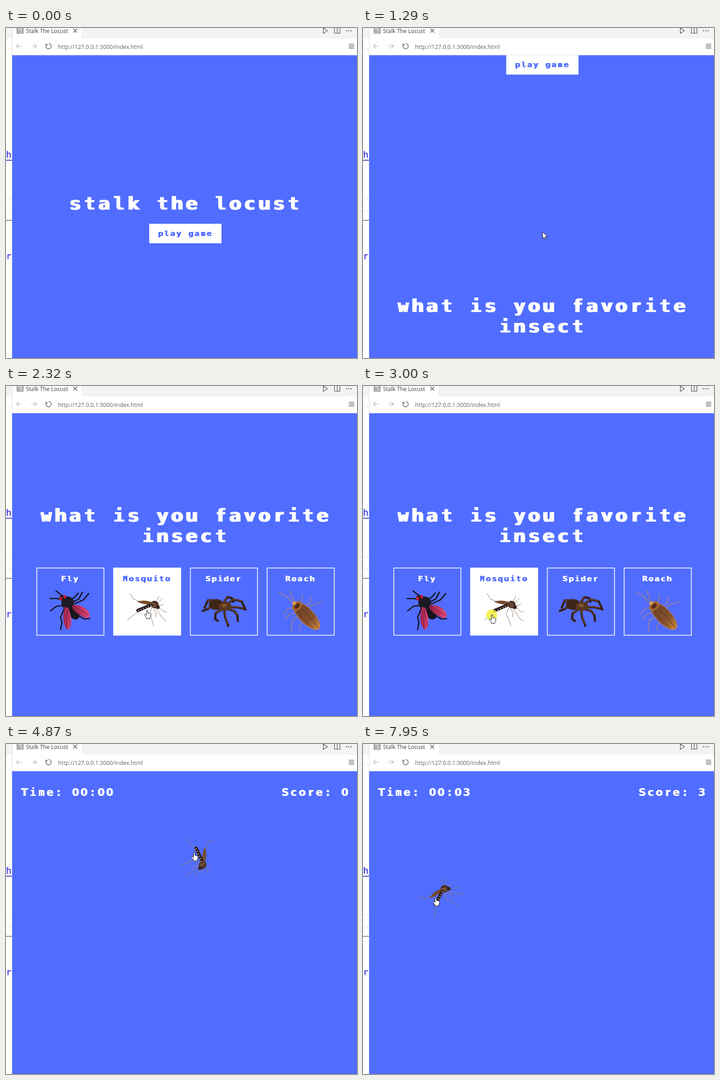
Write an HTML page that moves like this. It is 772 by 725 pixels and loops after 8 s.

```html
<!DOCTYPE html>
<html lang="en">
<head>
<meta charset="utf-8">
<title>Stalk The Locust</title>
<style>
  html, body { margin: 0; width: 100%; height: 100%; overflow: hidden; background: #fff; }
  svg { display: block; width: 772px; height: 725px; }
  .ui { font-family: "Open Sans", "Noto Sans", sans-serif; font-size: 12.3px; fill: #3b3b3b; }
  .code { font: 20px "DejaVu Sans Mono", monospace; fill: #1616e0; }
  .game {
    font-family: "DejaVu Sans", sans-serif; font-weight: 700; text-anchor: middle;
    color: #fff; fill: currentColor; filter: drop-shadow(.08em 0 0 currentColor);
  }
  .slab { font-family: "DejaVu Sans Mono", monospace; }
  .line { fill: none; stroke: #4a4a4a; stroke-width: 1.2; }
  .legs { fill: none; stroke-linecap: round; stroke-linejoin: round; }
</style>
</head>
<body>
<svg id="stage" viewBox="0 0 772 725" xmlns="http://www.w3.org/2000/svg">
  <defs>
    <clipPath id="view"><rect x="13" y="59.500" width="759" height="665.500"/></clipPath>
    <linearGradient id="shell" x1="0" x2="1">
      <stop offset="0" stop-color="#d89a50"/><stop offset=".25" stop-color="#74452a"/>
      <stop offset=".65" stop-color="#85502c"/><stop offset="1" stop-color="#d08a44"/>
    </linearGradient>
    <linearGradient id="wing" x1="0" x2="1">
      <stop offset="0" stop-color="#9c2045"/><stop offset="1" stop-color="#e8487a"/>
    </linearGradient>
    <g id="mosquito">
      <g class="legs" stroke="#927a6c" stroke-width="1">
        <path d="M4-13L-14-19-30-25-37-37M8-10L-22 5-43 21M12-9L5 8 11 21 15 34M18-10L29-4 36 2 43 4M17-8L27 6 34 17 42 23M16-16L22-22 26-31M20-14L29-21 34-27M23-9L37-13"/>
        <path d="M12-9L20 6 19 15"/>
      </g>
      <path d="M14-17Q-6-25-22-19Q-4-11 14-13z" fill="#6e4426"/>
      <path d="M-20-18.500L12-15.500" class="legs" stroke="#a4764a" stroke-width=".8"/>
      <path d="M-20 0L9-12" class="legs" stroke="#2a1a1c" stroke-width="7"/>
      <path d="M-19 .500L10-11" class="legs" stroke="#e8dcd4" stroke-width="3.500" stroke-dasharray="1.300 4.500" style="stroke-linecap:butt"/>
      <ellipse cx="17" cy="-13" rx="9" ry="8" transform="rotate(25 17 -13)" fill="#4c3224"/>
      <path d="M11-17L20-12M14-10L21-8" class="legs" stroke="#b58c62" stroke-width="1.300"/>
      <circle cx="24" cy="-7" r="4" fill="#33211c"/>
    </g>
    <g id="fly">
      <path class="legs" stroke="#14131b" stroke-width="2.700" d="M125 471L113 467 97 467M127 463L116 455 110 450M139 468L149 466 159 455M148 474L160 468 168 453M152 478L170 470 182 456M127 482L111 484 98 494M129 487L120 508 123 520 120 535M160 505L173 512 184 511"/>
      <ellipse cx="149" cy="496" rx="12" ry="18" transform="rotate(-25 149 496)" fill="#17151d"/>
      <ellipse cx="136" cy="477" rx="14" ry="15" transform="rotate(-25 136 477)" fill="#1c1a24"/>
      <path d="M130 485Q122 508 130 529Q137 540 142 529Q147 512 137 488z" fill="url(#wing)"/>
      <path d="M146 481Q170 480 182 497Q188 508 177 510Q157 503 146 489z" fill="url(#wing)"/>
      <path class="legs" stroke="#5e1631" d="M134 490L134 534M135 492L142 527M148 484L182 504M147 487L172 508"/>
      <ellipse cx="124" cy="465" rx="7" ry="6" fill="#22161c"/>
      <ellipse cx="120" cy="467" rx="3" ry="4" fill="#c81c34"/>
      <ellipse cx="129" cy="463" rx="3" ry="4" fill="#c81c34"/>
    </g>
    <g id="spider">
      <path class="legs" stroke="#33201b" stroke-width="5" d="M470 486L455 481 444 490 433 494M472 480L455 471 444 471 437 487M474 491L461 499 460 512 466 516M480 492L482 508 489 527M488 490L502 494 509 504 510 516M489 486L508 486 522 489 527 491M486 479L501 469 518 473 525 487M478 477L487 464 497 466 500 474"/>
      <path class="legs" stroke="#6e462c" stroke-width="2" d="M470 485L455 480 444 489M472 479L455 470 444 471M474 491L461 498M481 492L483 508 487 522M488 489L502 493 508 502M489 485L508 485 521 488M486 478L501 468 518 472M478 476L487 464"/>
      <ellipse cx="462" cy="480" rx="16" ry="12" fill="#402619"/>
      <ellipse cx="482" cy="484" rx="14" ry="10" fill="#58361f"/>
      <ellipse cx="480" cy="482" rx="6" ry="4" fill="#80532f"/>
    </g>
    <g id="roach">
      <path class="legs" stroke="#c58a58" stroke-width="1.200" d="M628 474L617 462 599 453M632 471L628 460 625 449M644 480L651 471 652 458M654 485L669 477 670 462M661 492L675 480 697 474M631 488L620 489 611 501M636 498L622 503 614 512M643 507L630 514 627 541M652 518L645 529 649 537"/>
      <g transform="translate(661 505) rotate(46)">
        <ellipse rx="39" ry="16" fill="url(#shell)" stroke="#bd814a"/>
        <path class="legs" stroke="#5c3520" d="M-28 0Q0-6 36 0M-24 6Q0 11 30 8"/>
        <ellipse cx="-30" rx="9" ry="12" fill="#a5692f"/>
        <ellipse cx="-30" rx="5" ry="7" fill="#553019"/>
        <circle cx="-39" r="4.500" fill="#d19a5a"/>
      </g>
    </g>
  </defs>

  <rect width="772" height="725" fill="#fff"/>
  <path d="M0 0H772V23H0z" fill="#f3f3f3"/>
  <path d="M13 0H166V24H13z" fill="#fff"/>
  <path d="M13.500 0V725M0 45.500H13M0 375.500H13M0 402H13" class="line" style="stroke:#e2e2e2"/>
  <path d="M0 290.500H13" class="line" style="stroke:#1616a0;stroke-width:1.600"/>
  <path d="M0 422.500H13" class="line"/>
  <text class="code" x="0" y="285">h</text>
  <text class="code" x="0" y="508">r</text>

  <path class="line" d="M24.500-1V11.500H37.500V-1M24.500 2.500H37.500M27 5.500H31V9H27zM33 5.500H36M33 8.500H36M148 1.500L156.500 10M156.500 1.500L148 10"/>
  <text class="ui" x="44" y="10.500">Stalk The Locust</text>
  <path class="line" d="M698 0L707 6 698 12zM722.500-1V11.500H734.500V-1M728.500-1V11.500"/>
  <g fill="#4a4a4a"><circle cx="749" cy="6" r="1.200"/><circle cx="754" cy="6" r="1.200"/><circle cx="759" cy="6" r="1.200"/></g>
  <path class="line" style="stroke:#b4b4b4" d="M35 40H23M28 35L23 40 28 45M55 40H67M62 35L67 40 62 45"/>
  <path class="line" d="M89.500 36A5.800 5.800 0 1 0 94 34.200M88 34V37.500H92M754 35.500H766M754 38.500H766M754 41.500H766M754 44.500H766"/>
  <text class="ui" x="114.500" y="45.500" style="font-size:12.400px;fill:#616161">http://127.0.0.1:3000/index.html</text>

  <g clip-path="url(#view)">
    <rect x="13.500" y="59.500" width="759" height="666" fill="#516dff"/>
    <g id="intro">
      <g id="button"><rect x="315" y="430" width="159" height="43" fill="#fff"/></g>
    </g>
    <g id="choose"></g>
    <g id="play"></g>
    <circle id="press" r="12" fill="#f4ee2c" opacity=".8"/>
    <g id="cursor" fill="#fff" stroke="#111" stroke-linejoin="round">
      <path id="arrow" d="M0 0V14.500L3.500 11.300 5.900 16.500 8.200 15.500 5.900 10.300H10.300z"/>
      <path id="hand" d="M-1.500 1.500q0-1.500 1.500-1.500t1.500 1.500v5l4.500 1q2.500 .600 2.300 3l-.800 4.500-1.500 2v2h-7.500v-2l-4-5.500q-1-1.800 .300-2.300t2.600 1l1.100 1.200z"/>
    </g>
  </g>
</svg>
<script>
const NS = 'http://www.w3.org/2000/svg';
const BLUE = '#516dff', LOOP = 8000, PAGE = 697;
const TO_CHOOSE = 1107, TO_PLAY = 3050;
const $ = id => document.getElementById(id);

function add(parent, tag, attrs) {
  const el = document.createElementNS(NS, tag);
  for (const k in attrs) el.setAttribute(k, attrs[k]);
  parent.appendChild(el);
  return el;
}

// Arcade lettering: every character centred in a square cell
const markup = s => s.replace(/[ilt1mwM]/g, '<tspan class="slab">$&</tspan>');
function lettering(parent, str, x, y, em, color) {
  const xs = [...str].map((c, i) => (x + (i + .39) * em).toFixed(2)).join(' ');
  const el = add(parent, 'text', { class: 'game', x: xs, y, 'font-size': em * 1.2 });
  if (color) el.style.color = color;
  el.innerHTML = markup(str);
  return el;
}
const centred = (parent, str, cx, y, em, color) =>
  lettering(parent, str, cx - str.length * em / 2, y, em, color);

const SMALL = 40 / 3, MID = 18.72, BIG = 32;
centred($('intro'), 'stalk the locust', 394.5, 399, BIG);
centred($('button'), 'play game', 394.5, 456.5, SMALL, BLUE);
centred($('choose'), 'what is you favorite', 394.5, 298, BIG);
centred($('choose'), 'insect', 394.5, 342.5, BIG);

const CARD = 147.7, CARD_Y = 399.8;
const cards = ['Fly', 'Mosquito', 'Spider', 'Roach'].map((name, i) => {
  const x = 67.7 + 168.9 * i, g = $('choose');
  const box = add(g, 'rect', { x, y: CARD_Y, width: CARD, height: CARD, stroke: '#fff', 'stroke-width': 1.6 });
  const label = centred(g, name, x + CARD / 2 - .5, 429, SMALL);
  const pic = add(g, 'use', { href: '#' + name.toLowerCase() });
  if (i === 1) pic.setAttribute('transform', 'translate(310 493)');
  return { x, box, label };
});

const clock = lettering($('play'), 'Time: 00:00', 33, 114.2, MID);
const score = lettering($('play'), 'Score: 0', 606.5, 114.2, MID);
const insects = [
  { x: 419, y: 249, turn: 88, on: 4050, off: 5150 },
  { x: 170, y: 498, turn: -60, on: 6150, off: 7190 },
  { x: 175, y: 339, turn: -41, on: 6650, off: 7945 }
];
insects.forEach(b => b.el = add($('play'), 'use', { href: '#mosquito' }));

const clicks = [TO_CHOOSE, TO_PLAY, ...insects.map(b => b.off)];
const path = [
  [180, 690, 740], [900, 395, 448], [1400, 395, 448], [1690, 364, 478], [1830, 364, 478],
  [2050, 470, 490], [2180, 470, 490], [2480, 120, 495], [2580, 130, 495], [2850, 284, 502.5],
  [3060, 284, 502.5], [3420, 288, 475], [4240, 316, 370], [4700, 418, 242], [4850, 414, 238],
  [5070, 414, 238], [5150, 415, 242], [5400, 424, 266], [5880, 424, 266], [6000, 423, 262],
  [6470, 423, 262], [7000, 165, 490], [7210, 165, 492], [7700, 160, 337], [8000, 160, 337]
];

const clamp = v => Math.max(0, Math.min(1, v));
const smooth = v => v * v * (3 - 2 * v);

// CSS timing curve with control points (a, 0) and (b, 1)
function bezier(p, a, b) {
  if (p <= 0 || p >= 1) return clamp(p);
  let lo = 0, hi = 1, s;
  for (let i = 0; i < 24; i++) {
    s = (lo + hi) / 2;
    const x = 3 * (1 - s) * (1 - s) * s * a + 3 * (1 - s) * s * s * b + s * s * s;
    if (x < p) lo = s; else hi = s;
  }
  return smooth(s);
}
const slide = (t, start) => PAGE * bezier((t - start) / 500, 0, .58);

function pointer(t) {
  let i = 0;
  while (i < path.length - 2 && t >= path[i + 1][0]) i++;
  const [t0, x0, y0] = path[i], [t1, x1, y1] = path[i + 1];
  const k = smooth(clamp((t - t0) / (t1 - t0)));
  return [x0 + (x1 - x0) * k, y0 + (y1 - y0) * k];
}

const move = (el, x, y) => el.setAttribute('transform', `translate(${x} ${y})`);
const show = (el, on) => el.setAttribute('visibility', on ? 'visible' : 'hidden');
function write(el, str) {
  if (el.textContent !== str) el.innerHTML = markup(str);
}

function draw(t) {
  const first = -slide(t, TO_CHOOSE);
  const second = first + PAGE - slide(t, TO_PLAY);
  const third = second + PAGE;
  move($('intro'), 0, first);
  move($('choose'), 0, second);
  move($('play'), 0, third);

  const [x, y] = pointer(t);
  const inside = (l, top, w, h) => x >= l && x <= l + w && y >= top && y <= top + h;

  const onButton = inside(315, 430 + first, 159, 43);
  $('button').setAttribute('opacity', onButton ? .9 : 1);
  let hot = onButton;

  cards.forEach(c => {
    const over = inside(c.x, CARD_Y + second, CARD, CARD);
    c.box.setAttribute('fill', over ? '#fff' : 'none');
    c.label.style.color = over ? BLUE : '#fff';
    hot = hot || over;
  });

  insects.forEach(b => {
    const size = 1 - bezier((t - b.off) / 300, .42, .58);
    const live = t >= b.on && size > 0;
    show(b.el, live);
    b.el.setAttribute('transform', `translate(${b.x} ${b.y}) scale(${size}) rotate(${b.turn})`);
    const r = 50 * size;
    hot = hot || (live && inside(b.x - r, b.y - r, 2 * r, 2 * r));
  });

  const secs = Math.max(0, Math.floor((t - TO_PLAY) / 1000) - 1);
  write(clock, 'Time: 00:0' + secs);
  write(score, 'Score: ' + insects.filter(b => t >= b.off).length);

  move($('cursor'), x, y);
  show($('arrow'), !hot);
  show($('hand'), hot);
  move($('press'), x - 1, y + .5);
  show($('press'), clicks.some(c => t >= c - 90 && t < c));
}

const begin = performance.now();
function tick() {
  draw((performance.now() - begin) % LOOP);
  requestAnimationFrame(tick);
}
tick();
</script>
</body>
</html>
```
